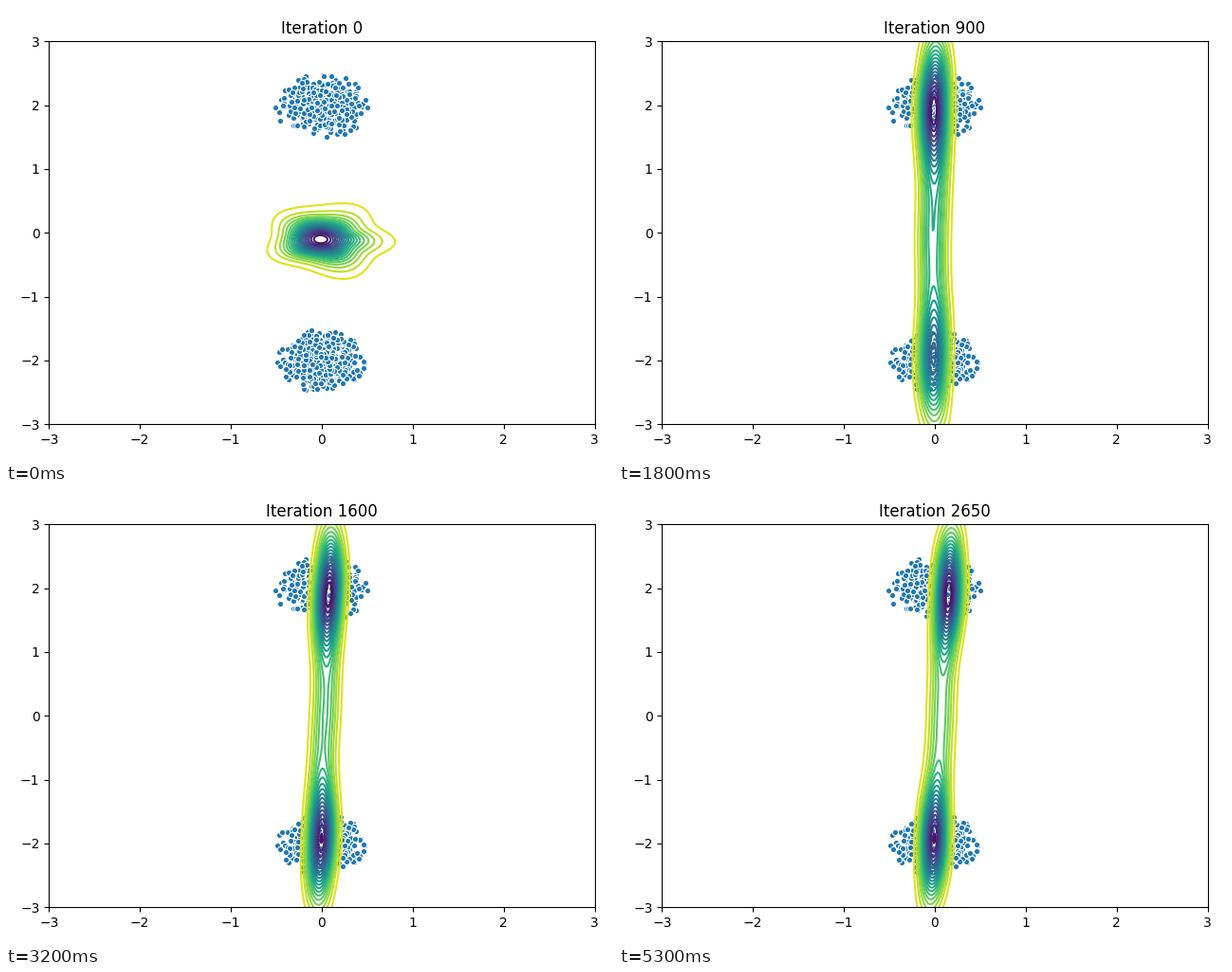
A matplotlib script that plays this animation: 640x480 px, repeating every 7300 ms.

```python
import numpy as np
import matplotlib.pyplot as plt
from matplotlib.animation import FuncAnimation

LAST_STEP, TOTAL_FRAMES, INTERVAL = 53, 73, 100
STRETCH_STEPS = 5  # the first blob becomes a column in this time
LEVELS = np.arange(1, 20) / 20

X, Y = np.meshgrid(np.linspace(-1.2, 1.2, 300), np.linspace(-3.1, 3.1, 300))


def bell(values, centre, spread):
    return np.exp(-0.5 * ((values - centre) / spread) ** 2)


def bump(x, y, centre, spread):
    return bell(x, centre[0], spread[0]) * bell(y, centre[1], spread[1])


def smoothstep(start, end, value):
    u = np.clip((value - start) / (end - start), 0, 1)
    return u * u * (3 - 2 * u)


def blob(x, y):
    """Untrained output: a lobed heap, longer towards the lower right."""
    radius = np.hypot(x, y + .08)
    angle = np.arctan2((y + .08) / .75, x - .1)
    lobes = 1 + .15 * np.tanh(radius) * np.cos(5 * angle + .5)
    x, y = x / lobes, y / lobes
    return (bump(x, y, (-.04, -.09), (.21, .18))
            + .25 * bump(x, y, (.20, -.20), (.25, .21))
            + .15 * bump(x, y, (.08, -.06), (.40, .38)))


def column(step):
    """Two modes joined by a bridge that fades as training goes on."""
    age = step - STRETCH_STEPS
    early = np.exp(-age / 6)
    spread = .57 + .5 * early
    upper = .52 + .42 * smoothstep(5, 18, step)
    lower = .34 + .56 * smoothstep(13, 22, step)
    bridge = .27 + .45 * np.exp(-age / 10)
    profile = (upper * bell(Y, 1.93 + .35 * early, spread)
               + bridge * bell(Y, .3 * early, 1 + .3 * early)
               + lower * bell(Y, -1.95 - .2 * early, spread))

    # The top swings ever wider while the bottom stays put.
    swing = .12 * (step / 50) ** 1.5
    top = .02 + swing * np.cos(2 * np.pi * (step - LAST_STEP) / 22)
    bottom = -.01
    centre = (top + bottom) / 2 + (top - bottom) / 4 * Y
    centre = centre + early * (.013 * Y ** 2 - .07) + .006 * np.sin(3 * Y + step)
    width = .09 + .047 * np.exp(-age / 8)
    return profile * bell(X, centre, width)


def density(step):
    grown = min(step / STRETCH_STEPS, 1)
    z = grown * column(max(step, STRETCH_STEPS))
    z = z + (1 - grown) * blob(X, Y / (1 + 7 * grown))
    return z / z.max()


def cluster(rng, y, count=500, spread=.21, limit=.52):
    points = rng.normal(0, spread, (2 * count, 2))
    inside = np.hypot(*points.T) < limit
    return points[inside][:count] + [0, y]


rng = np.random.default_rng(4)
data = rng.permutation(np.vstack([cluster(rng, 2), cluster(rng, -2)]))

fig, ax = plt.subplots(figsize=(6.4, 4.8), dpi=100)
ax.set(xlim=(-3, 3), ylim=(-3, 3), title="Iteration 0")
ax.scatter(*data.T, s=20, color="C0", edgecolors="white", linewidths=.75)
fig.tight_layout()


def draw(frame):
    step = min(frame, LAST_STEP)
    for artist in list(ax.collections)[1:]:
        artist.remove()
    ax.contour(X, Y, density(step), LEVELS, cmap="viridis_r", vmin=0, vmax=1,
               linewidths=1.5)
    ax.set_title(f"Iteration {50 * step}")
    return []


anim = FuncAnimation(fig, draw, frames=TOTAL_FRAMES, interval=INTERVAL,
                     init_func=lambda: draw(0), repeat=True, repeat_delay=0)
plt.show()
```
